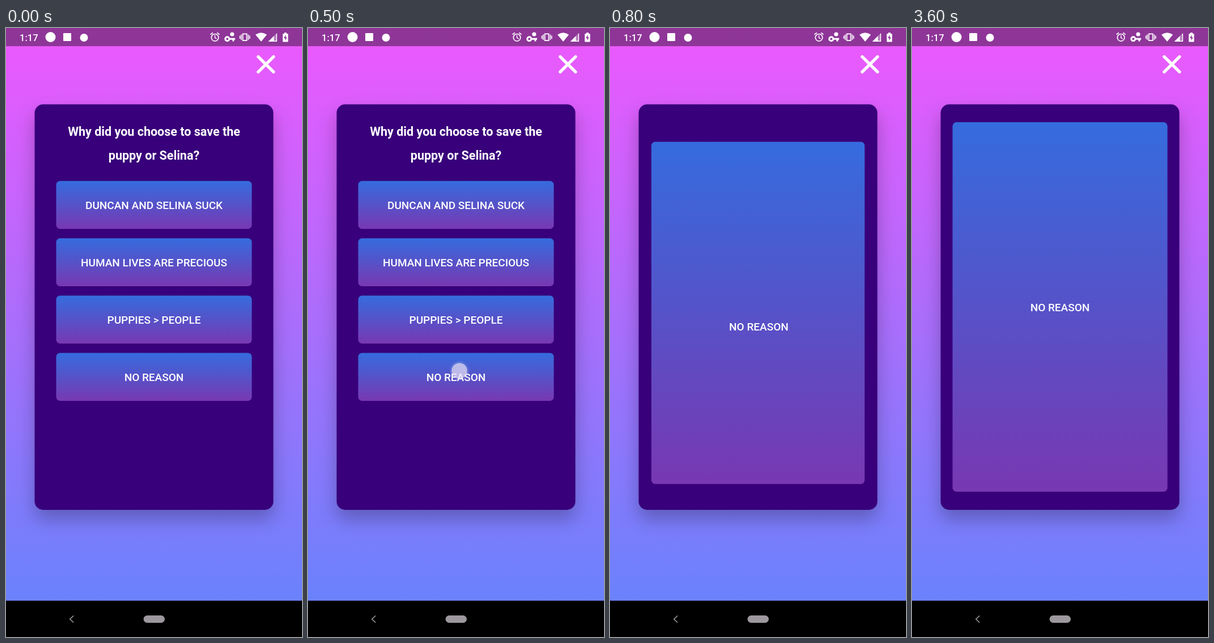
Animation, 522 px wide and 1073 px high, one loop 6100 ms. Source, as an HTML page with a canvas:

```html
<!DOCTYPE html>
<html lang="en">
<head>
<meta charset="utf-8">
<title>Choice card</title>
<style>
  html, body { margin: 0; width: 100%; height: 100%; overflow: hidden; background: #000; }
  canvas { display: block; width: 522px; height: 1073px; }
</style>
</head>
<body>
<canvas id="stage" width="522" height="1073"></canvas>
<script>
const ctx = document.getElementById('stage').getContext('2d');
const LOOP = 6100, STEP = 100;
const TAP = 400, OPEN = 600, RELEASE = 700;
const FLIGHT_START = 466, FLIGHT_TIME = 508;
const FONT = 'Roboto, sans-serif';
const SMALL = { x: 88.5, y: 572.5, w: 345, h: 84.5 };
const LARGE = { x: 71.5, y: 166, w: 379, h: 651 };
const TITLE = ['Why did you choose to save the', 'puppy or Selina?'];
const CHOICES = ['DUNCAN AND SELINA SUCK', 'HUMAN LIVES ARE PRECIOUS', 'PUPPIES > PEOPLE', 'NO REASON'];

const mix = (a, b, p) => a + (b - a) * p;

// cubic-bezier(.4, 0, .2, 1)
function ease(x) {
  if (x <= 0) return 0;
  if (x >= 1) return 1;
  let lo = 0, hi = 1;
  for (let i = 0; i < 24; i++) {
    const s = (lo + hi) / 2, r = 1 - s;
    if (1.2 * s * r * r + 0.6 * s * s * r + s * s * s < x) lo = s; else hi = s;
  }
  return lo * lo * (3 - 2 * lo);
}

function vertical(y0, y1, from, to) {
  const g = ctx.createLinearGradient(0, y0, 0, y1);
  g.addColorStop(0, from);
  g.addColorStop(1, to);
  return g;
}

function box(x, y, w, h, r, fill) {
  ctx.beginPath();
  ctx.roundRect(x, y, w, h, r);
  ctx.fillStyle = fill;
  ctx.fill();
}

function disc(x, y, r, fill = '#fff') {
  ctx.beginPath();
  ctx.arc(x, y, r, 0, Math.PI * 2);
  ctx.fillStyle = fill;
  ctx.fill();
}

function poly(fill, ...pts) {
  ctx.beginPath();
  pts.forEach(([x, y]) => ctx.lineTo(x, y));
  ctx.closePath();
  ctx.fillStyle = fill;
  ctx.fill();
}

function line(width, color, ...pts) {
  ctx.beginPath();
  pts.forEach(([x, y]) => ctx.lineTo(x, y));
  ctx.lineWidth = width;
  ctx.strokeStyle = color;
  ctx.stroke();
}

function label(text, x, y, font, align = 'center') {
  ctx.font = `${font} ${FONT}`;
  ctx.textAlign = align;
  ctx.fillStyle = '#fff';
  ctx.fillText(text, x, y);
}

function button({ x, y, w, h }) {
  box(x, y, w, h, 7, vertical(y, y + h, '#356cde', '#7838b2'));
}

function statusBar() {
  ctx.fillStyle = 'rgba(0,0,0,.4)';
  ctx.fillRect(0, 0, 522, 32);
  label('1:17', 24, 22.5, '500 16.5px', 'left');

  disc(78.5, 16, 9);
  box(101, 9, 14, 14, 1, '#fff');
  disc(137.5, 17, 7);

  // alarm
  ctx.lineCap = 'round';
  ctx.beginPath();
  ctx.arc(368.5, 16.8, 6.3, 0, Math.PI * 2);
  ctx.lineWidth = 1.7;
  ctx.strokeStyle = '#fff';
  ctx.stroke();
  line(1.4, '#fff', [368.5, 13.3], [368.5, 17.2], [371, 18.8]);
  line(1.7, '#fff', [361, 11.2], [364.2, 8.6]);
  line(1.7, '#fff', [376, 11.2], [372.8, 8.6]);

  // key
  ctx.lineCap = 'butt';
  ctx.beginPath();
  ctx.arc(390.2, 19.2, 3.5, 0, Math.PI * 2);
  ctx.lineWidth = 3;
  ctx.stroke();
  line(3, '#fff', [394, 19.2], [404, 19.2]);
  line(3, '#fff', [400.8, 19.2], [400.8, 23.5]);
  disc(398.8, 11, 3.6);

  // vibrate
  ctx.lineWidth = 1.8;
  ctx.strokeRect(417.6, 10.4, 7, 11.6);
  for (const side of [-1, 1]) {
    line(1.6, '#fff', [421.1 + side * 6.3, 11.5], [421.1 + side * 6.3, 21]);
    line(1.6, '#fff', [421.1 + side * 8.6, 13.5], [421.1 + side * 8.6, 19]);
  }

  // wifi
  ctx.beginPath();
  ctx.moveTo(450, 24);
  ctx.lineTo(440, 11.8);
  ctx.quadraticCurveTo(450, 4.6, 460, 11.8);
  ctx.closePath();
  ctx.fillStyle = '#fff';
  ctx.fill();

  // signal
  poly('rgba(255,255,255,.35)', [462.5, 24], [478, 24], [478, 8.5]);
  poly('#fff', [462.5, 24], [472.5, 24], [472.5, 14]);
  line(1.4, '#fff', [464, 23.3], [477.3, 23.3], [477.3, 10]);

  // battery
  box(488, 10, 9.5, 14.5, 1.2, '#fff');
  ctx.fillRect(490.8, 8, 4, 2.5);
  poly('#8f3797', [493.4, 11.8], [490, 18], [492.4, 18], [492.4, 22.3], [495.6, 16.4], [493.4, 16.4]);
}

function scenery() {
  ctx.fillStyle = vertical(0, 1009, '#ee58fd', '#6a82fc');
  ctx.fillRect(0, 0, 522, 1009);
  statusBar();

  ctx.lineCap = 'round';
  line(5.4, '#fff', [444.8, 50.6], [471.8, 77.4]);
  line(5.4, '#fff', [471.8, 50.6], [444.8, 77.4]);

  ctx.fillStyle = '#000';
  ctx.fillRect(0, 1009, 522, 64);
  line(1.7, '#99969d', [118.6, 1036], [112.8, 1041.5], [118.6, 1047]);
  box(242.5, 1035, 37.5, 13, 6.5, '#9c989d');

  ctx.save();
  ctx.shadowColor = 'rgba(0,0,0,.26)';
  ctx.shadowBlur = 32;
  ctx.shadowOffsetY = 16;
  box(50.5, 134.5, 421, 714.5, 15, '#38007a');
  ctx.restore();
}

function question() {
  TITLE.forEach((text, i) => label(text, 261, 189.5 + i * 42.5, '700 21.5px'));
  CHOICES.forEach((text, i) => {
    const y = 269.5 + i * 101;
    button({ ...SMALL, y });
    label(text, 261, y + 49.7, '500 19px');
  });
}

// The label keeps its final offset inside the growing box and is clipped by it.
function answer(t) {
  const p = ease((t - FLIGHT_START) / FLIGHT_TIME);
  const r = {};
  for (const k in SMALL) r[k] = mix(SMALL[k], LARGE[k], p);
  button(r);
  ctx.save();
  ctx.clip();
  label(CHOICES[3], r.x + LARGE.w / 2, r.y + 332.8, '500 19px');
  ctx.restore();
}

function touch(alpha) {
  disc(267, 604, 17, `rgba(255,255,255,${alpha * 0.15})`);
  disc(267, 604, 13.8, `rgba(235,225,245,${alpha})`);
}

function draw(now) {
  const t = Math.floor((now % LOOP) / STEP) * STEP;
  scenery();
  if (t < OPEN) question(); else answer(t);
  if (t >= TAP && t < RELEASE) touch(t < OPEN ? 0.68 : 0.42);
  requestAnimationFrame(tick);
}

let start;
function tick(now) {
  start ??= now;
  draw(now - start);
}
requestAnimationFrame(tick);
</script>
</body>
</html>
```
